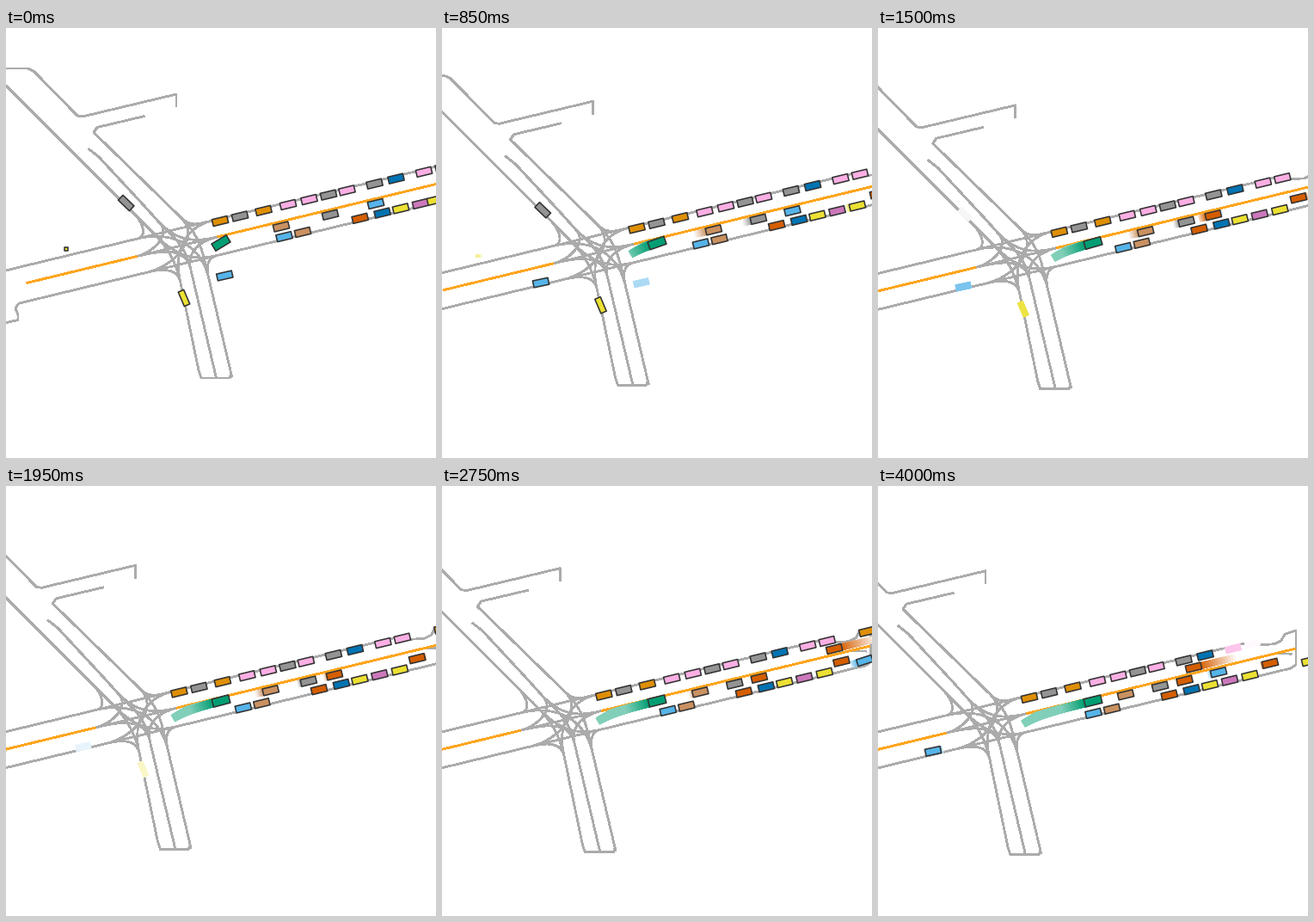
These frames come from a looping animation (500 px wide and 500 px high, 4.05 s). A matplotlib script:

```python
import matplotlib.pyplot as plt
import numpy as np
from itertools import permutations
from matplotlib.animation import FuncAnimation
from matplotlib.collections import LineCollection, PolyCollection
from matplotlib.colors import to_rgb

SIZE, DPI = 500, 100
FRAMES, STEP = 81, 50
PX = 72 / DPI
FADE = 14          # frames until a trace has turned white
EGO_FADE = 27      # distance over which the followed car's trace pales
SLOPE = 0.2415     # the main road is straight
ROAD = -np.degrees(np.arctan(SLOPE))

BLUE, ORANGE, GREEN, RED = "#0173b2", "#de8f05", "#029e73", "#d55e00"
PURPLE, BROWN, PINK = "#cc78bc", "#ca9161", "#fbafe4"
GREY, YELLOW, SKY = "#949494", "#ece133", "#56b4e9"

# heights of the lanes and lines of the main road at x = 250
TOP, MID, BOTTOM = 221.5, 241.9, 263.4
UPPER_KERB, LOWER_KERB, INNER, ONCOMING = 224.3, 260.4, 247.9, 235.2

f = np.arange(FRAMES)


def on_road(x, lane):
    return np.stack([x, lane - SLOPE * (x - 250)], axis=-1)


def south(x, y):
    """Point on a line of the southern road that crosses y = 290 at x."""
    return x + 0.235 * (y - 290), y


def ease(a, b, start, end, power=1.0):
    s = np.clip((f - start) / (end - start), 0, 1)
    return a + (b - a) * (1 - (1 - s) ** power)


def box(center, angle, length, width):
    a = np.radians(angle)
    u = np.array([np.cos(a), np.sin(a)]) * length / 2
    w = np.array([-np.sin(a), np.cos(a)]) * width / 2
    return np.array([u + w, u - w, -u - w, -u + w]) + center


class Car:
    def __init__(self, color, path, first=0, last=FRAMES - 1, angle=ROAD,
                 size=(18, 8)):
        self.rgb = np.array(to_rgb(color))
        self.first, self.last = first, last
        path = np.broadcast_to(path, (FRAMES, 2))
        angles = np.broadcast_to(angle, FRAMES)
        self.boxes = [box(p, a, *size) for p, a in zip(path, angles)]

    def seen(self, t):
        return self.first <= t <= self.last

    def faded(self, amount):
        return self.rgb + (1 - self.rgb) * amount


def driving(color, x, lane=INNER, **kw):
    return Car(color, on_road(x, lane), **kw)


def parked_row(lane, *row):
    return [driving(color, np.float64(x), lane) for color, x in row]


# The followed car slows down and swings into its lane.
turn = np.pi * f / (FRAMES - 1)
gone = 73 * f / (FRAMES - 1) + 12.1 * np.sin(turn) - 0.5 * np.sin(2 * turn)
camera = np.stack([gone, -SLOPE * gone - 4.2 * (1 - np.exp(-gone / 20))], axis=1)
ego = Car(GREEN, camera + 250, angle=ROAD - 17.5 * np.exp(-f / 15),
          size=(20, 9.5))

cars = parked_row(
    UPPER_KERB, (ORANGE, 249), (GREY, 272), (ORANGE, 299.5), (PINK, 328),
    (PINK, 352.5), (GREY, 375), (PINK, 396.5), (GREY, 428.5), (BLUE, 453.5))
cars += parked_row(
    LOWER_KERB, (SKY, 323.5), (BROWN, 345), (RED, 411.7), (BLUE, 437.6),
    (YELLOW, 459), (PURPLE, 482), (YELLOW, 575))
cars += [
    driving(PINK, ease(486, 486, 0, 1), UPPER_KERB, last=76),
    driving(PINK, ease(508.5, 508.5, 0, 1), UPPER_KERB, last=67),
    driving(ORANGE, ease(555, 555, 0, 1), UPPER_KERB, last=60),
    driving(YELLOW, ease(499, 505.5, 0, 17), LOWER_KERB),
    driving(BROWN, ease(320, 361, 0, 55, 1.6)),
    driving(GREY, ease(377, 401, 0, 55, 2.2)),
    driving(SKY, ease(430, 430, 0, 1), last=18),
    driving(RED, ease(420, 429.5, 19, 32), first=19),
    driving(SKY, ease(457, 469, 57, 80, 1.8), first=57),
    driving(RED, 528 + 3 * np.cos(2 * np.pi * f / 100), INNER + 4),
    driving(SKY, ease(545, 557, 46, 61), INNER + 9.5, first=46, last=61,
            angle=-18),
    driving(RED, ease(569, 440, 38, 80), ONCOMING, first=38),
    Car(GREY, (139.7, 203.5), last=17, angle=44),
    Car(YELLOW, (207, 314), last=29, angle=67, size=(18, 7)),
    Car(SKY, (254.3, 288), last=10, angle=-13),
    Car(SKY, (137.5, 287.8), first=11, last=27, angle=-12),
    Car(SKY, np.stack([ease(140, 137, 66, 80), 286.6 + 0 * f], 1), first=62,
        angle=-12),
    Car(YELLOW, (70 - 0.6 * f)[:, None] * [1, 0] + [0, 256.6], last=10,
        angle=0, size=(4.5, 4)),
    ego,
]

# Each arm of the junction: its way in, its middle, its way out, and the
# direction that leads into the junction.
arms = [
    (on_road(165, BOTTOM), on_road(152, MID), on_road(153, TOP), (1, -SLOPE)),
    ((150, 217), (178, 226), (204, 221), (0.71, 0.71)),
    (on_road(240, TOP), on_road(246, MID), on_road(245, BOTTOM), (-1, SLOPE)),
    (south(235.5, 290), south(217, 280), south(201.5, 295), (-0.23, -0.97)),
]


def bend(p, p_dir, q, q_dir, reach=0.42):
    p, q = np.array(p, float), np.array(q, float)
    k = reach * np.hypot(*(q - p))
    a, b = p + k * np.array(p_dir), q + k * np.array(q_dir)
    s = np.linspace(0, 1, 24)[:, None]
    return ((1 - s) ** 3 * p + 3 * s * (1 - s) ** 2 * a
            + 3 * s * s * (1 - s) * b + s ** 3 * q)


lines = []
for (a_in, a_mid, _, a_dir), (_, b_mid, b_out, b_dir) in permutations(arms, 2):
    lines.append(bend(a_in, a_dir, b_out, b_dir))
    lines.append(bend(a_mid, a_dir, b_mid, b_dir))

edges = [
    [on_road(-20, TOP), on_road(153, TOP)],
    [(-6, 344), (14, 339.5), (14, 334), (11, 325.5), on_road(15, BOTTOM),
     on_road(165, BOTTOM)],
    [(0, 67), (150, 217)],
    [(96, 140.5), (108, 150), (160, 206), (178, 226)],
    [(161, 102.5), (106, 115.5), (102, 121.5), (204, 221)],
    [(-5, 47), (25, 47), (32, 50), (83, 102), (89, 103), (198, 77), (198, 92)],
    [south(201.5, 295), (224, 398), (227, 407), (260, 407), (262, 402)],
    [south(217, 280), south(217, 406)],
    [south(235.5, 290), south(235.5, 406)],
    [on_road(240, TOP), on_road(500, TOP), (518, 163), (534, 162), (542, 158),
     (546, 150.5), (559, 146.3), (559, 186), on_road(553, BOTTOM),
     on_road(245, BOTTOM)],
    [(525, 175.5), (535, 173), (554, 173.5)],
]
lines += [np.array(e, float) for e in edges]
centers = [on_road(np.array(x), MID) for x in ([24, 152], [246, 558])]

fig = plt.figure(figsize=(SIZE / DPI, SIZE / DPI), dpi=DPI, facecolor="white")
ax = fig.add_axes([0, 0, 1, 1])
ax.set_xlim(0, SIZE)
ax.set_ylim(SIZE, 0)
ax.axis("off")

road = LineCollection([], colors="#ababab", linewidths=1.7 * PX,
                      antialiaseds=False, zorder=1)
middle = LineCollection([], colors="#ffa51e", linewidths=1.8 * PX,
                        antialiaseds=False, zorder=2)
traces = PolyCollection([], edgecolors="none", zorder=3)
bodies = PolyCollection([], edgecolors="#333333", linewidths=1.6 * PX, zorder=4)
for layer in (road, middle, traces, bodies):
    ax.add_collection(layer, autolim=False)


def trace_parts(now):
    """Past boxes with their fading colours, oldest first."""
    for past in range(now):
        age = now - past
        for car in cars:
            if not car.seen(past):
                continue
            if car is ego:
                way = (gone[now] - gone[past]) / EGO_FADE
                yield car.boxes[past], car.faded(0.5 * min(way, 1))
            elif age < FADE:
                yield car.boxes[past], car.faded(age / FADE)


def draw(now):
    shift = -camera[now]
    road.set_segments([p + shift for p in lines])
    middle.set_segments([p + shift for p in centers])

    parts = list(trace_parts(now))
    traces.set_verts([b + shift for b, _ in parts])
    traces.set_facecolor([c for _, c in parts] or "none")

    here = [c for c in cars if c.seen(now)]
    bodies.set_verts([c.boxes[now] + shift for c in here])
    bodies.set_facecolor([c.rgb for c in here])
    return road, middle, traces, bodies


anim = FuncAnimation(fig, draw, frames=FRAMES, interval=STEP, repeat=True,
                     repeat_delay=0, blit=False)
plt.show()
```
